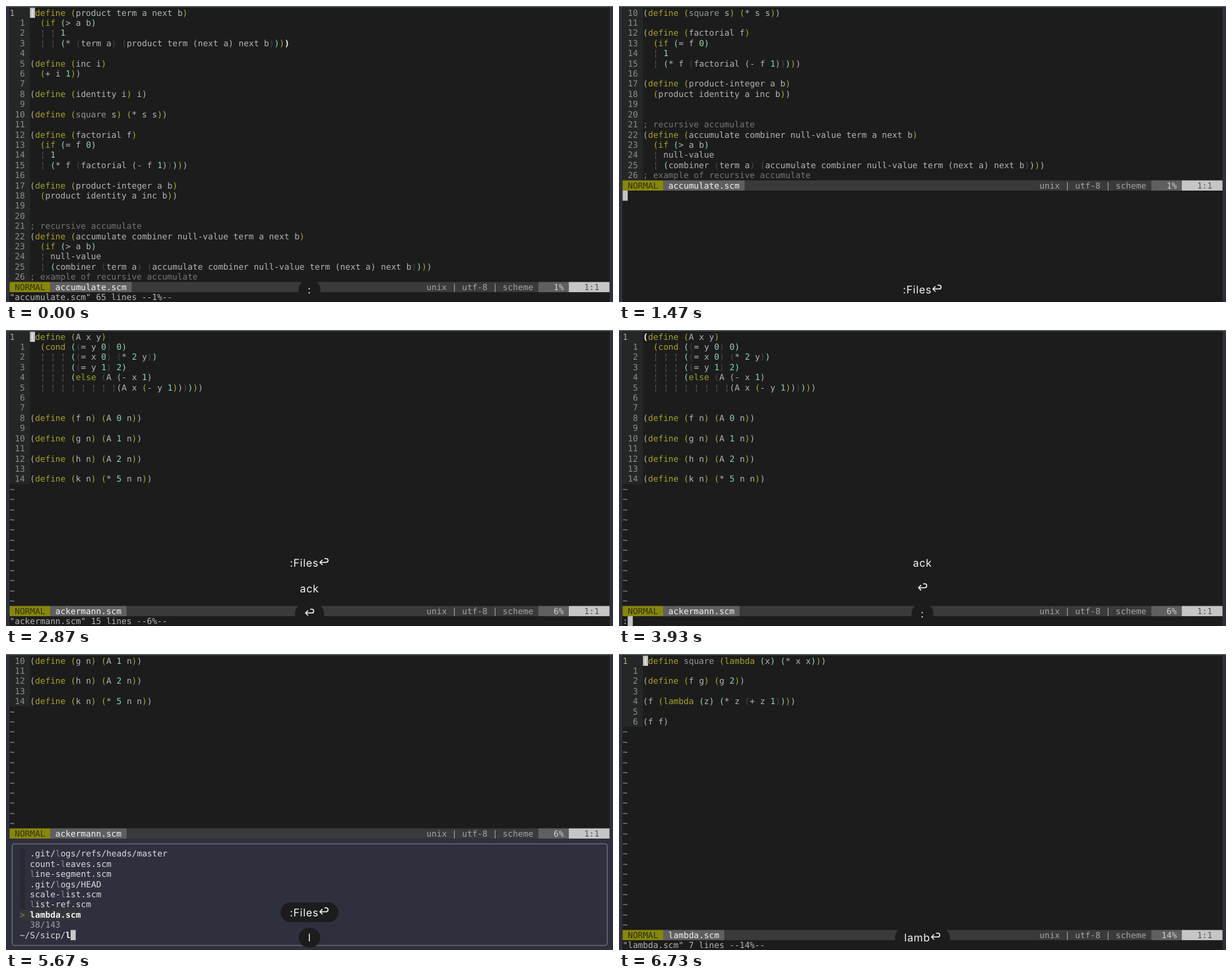
Recreate the animation shown at these times as an HTML page. Size 920 by 449 pixels, loop 8 s.

```html
<!DOCTYPE html>
<html lang="en">
<head>
<meta charset="utf-8">
<title>Fuzzy file opening</title>
<style>
  html, body { margin: 0; width: 100%; height: 100%; overflow: hidden; background: #2e303d; }
  svg { display: block; }
  text { white-space: pre; text-rendering: geometricPrecision; }
  .mono { font: 12.8px "DejaVu Sans Mono", monospace; }
  .key { font: 16px Inter, sans-serif; letter-spacing: .65px; fill: #f4f4f4; }
</style>
</head>
<body>
<svg id="stage" width="920" height="449" viewBox="0 0 920 449"></svg>
<script>
const LOOP = 8000;
const CELL_W = 7.705, CELL_H = 15.41, LEFT = 5.5, TOP = 2.6, COLS = 118;
const KEY_GAP = 500, KEY_LIFE = 2000;

const C = {
  frame: '#2e303d', bg: '#1c1c1c', gutter: '#252626', text: '#b4b4b4', dim: '#8c8c8c',
  comment: '#757575', guide: '#5a5a5a', keyword: '#a5a126', number: '#8bd5ae',
  white: '#f4f4f4', cursor: '#c4c4c4'
};
const PARENS = ['#b4b4b4', '#b0a92c', '#96d8b6', '#464646'];

const FILES = [
  { name: 'accumulate.scm', lines: 65, percent: '1%', match: 3, code: `(define (product term a next b)
  (if (> a b)
  ¦ ¦ 1
  ¦ ¦ (* (term a) (product term (next a) next b))))

(define (inc i)
  (+ i 1))

(define (identity i) i)

(define (square s) (* s s))

(define (factorial f)
  (if (= f 0)
  ¦ 1
  ¦ (* f (factorial (- f 1)))))

(define (product-integer a b)
  (product identity a inc b))


; recursive accumulate
(define (accumulate combiner null-value term a next b)
  (if (> a b)
  ¦ null-value
  ¦ (combiner (term a) (accumulate combiner null-value term (next a) next b))))
; example of recursive accumulate` },
  { name: 'ackermann.scm', lines: 15, percent: '6%', code: `(define (A x y)
  (cond ((= y 0) 0)
  ¦ ¦ ¦ ((= x 0) (* 2 y))
  ¦ ¦ ¦ ((= y 1) 2)
  ¦ ¦ ¦ (else (A (- x 1)
  ¦ ¦ ¦ ¦ ¦ ¦ ¦ ¦(A x (- y 1))))))


(define (f n) (A 0 n))

(define (g n) (A 1 n))

(define (h n) (A 2 n))

(define (k n) (* 5 n n))` },
  { name: 'lambda.scm', lines: 7, percent: '14%', code: `(define square (lambda (x) (* x x)))

(define (f g) (g 2))

(f (lambda (z) (* z (+ z 1))))

(f f)` }
];

// Each query lists its hits from top to bottom; the last one is selected.
const HITS = {
  '': [143, '.git/packed-refs .git/index .git/description .git/config .git/HEAD accumulate.scm abs.scm'],
  a: [112, 'average.scm append.scm adjoin-set.scm abs.scm adder.scm accumulate.scm ackermann.scm'],
  ac: [24, 'make-account.scm fast-exact.scm accumulate-n.scm accumulate.scm ackermann.scm'],
  ack: [1, 'ackermann.scm'],
  l: [38, '.git/logs/refs/heads/master count-leaves.scm line-segment.scm .git/logs/HEAD scale-list.scm list-ref.scm lambda.scm'],
  la: [9, '.git/logs/refs/heads/master .git/logs/HEAD count-leaves.scm lambda.scm'],
  lam: [3, '.git/logs/refs/heads/master count-leaves.scm lambda.scm'],
  lamb: [1, 'lambda.scm']
};

const SCENES = [
  [0, 'edit', 0], [70, 'command', 0], [1400, 'run', 0], [1470, 'split', 0], [1530, 'finder', 0],
  [2870, 'edit', 1], [3870, 'command', 1], [4800, 'run', 1], [4870, 'finder', 1], [6400, 'edit', 2]
];

const STROKES = [
  [0, ':'], [200, 'F'], [330, 'i'], [470, 'l'], [800, 'e'], [1130, 's'], [1400, '⏎'],
  [2070, 'a'], [2200, 'c'], [2270, 'k'], [2800, '⏎'],
  [3800, ':'], [4000, 'F'], [4130, 'i'], [4200, 'l'], [4330, 'e'], [4530, 's'], [4730, '⏎'],
  [5670, 'l'], [5730, 'a'], [5870, 'm'], [6000, 'b'], [6330, '⏎']
];

const stage = document.getElementById('stage');
const colX = col => LEFT + col * CELL_W;
const rowY = row => TOP + row * CELL_H;
const escapeXml = s => s.replace(/[&<>]/g, c => `&#${c.charCodeAt(0)};`);
const span = (s, fill, bold) =>
  `<tspan fill="${fill}"${bold ? ' font-weight="700"' : ''}>${escapeXml(s)}</tspan>`;
const line = (row, col, spans) =>
  `<text class="mono" x="${colX(col)}" y="${rowY(row) + 12}">${spans}</text>`;
const put = (row, col, s, fill = C.text, bold) => line(row, col, span(s, fill, bold));
const rect = (x, y, w, h, fill, extra = '') =>
  `<rect x="${x}" y="${y}" width="${w}" height="${h}" fill="${fill}" ${extra}/>`;
const cells = (row, col, cols, fill, rows = 1) =>
  rect(colX(col), rowY(row), cols * CELL_W, rows * CELL_H, fill);

function highlight(file) {
  let depth = 0;
  return file.code.split('\n').map((source, row) => {
    if (source[0] === ';') return span(source, C.comment);
    const tokens = source.match(/[()]|¦|\s+|[^\s()¦]+/g) || [];
    return tokens.map((token, i) => {
      if (token === '(') return span(token, PARENS[depth++ % 4]);
      if (token === ')') {
        const matched = row === file.match && i === tokens.length - 1;
        const fill = PARENS[--depth % 4];
        return span(token, matched ? C.white : fill, matched);
      }
      if (token === '¦') return span(token, C.guide);
      if (/^(define|if|cond|else|lambda)$/.test(token)) return span(token, C.keyword);
      if (/^\d+$/.test(token)) return span(token, C.number);
      return span(token, token === 'square' ? '#969696' : C.text);
    }).join('');
  });
}
FILES.forEach(file => { file.rows = highlight(file); });

function drawBuffer(file, height) {
  const first = height < 27 ? 10 : 0;
  const shown = Math.min(file.rows.length - first, height);
  let out = cells(0, 0, 4, C.gutter, shown);
  for (let row = 0; row < height; row++) {
    const n = row + first;
    if (row >= shown) { out += put(row, 0, '~', '#9a9a9a'); continue; }
    out += n ? put(row, 0, String(n).padStart(3), C.dim) : put(row, 0, '1', '#a9a994');
    out += line(row, 4, file.rows[n]);
  }
  return out + drawStatus(file, height);
}

function drawStatus(file, row) {
  return cells(row, 0, COLS, '#3a3a3a') +
    cells(row, 0, 8, '#87870c') + put(row, 1, 'NORMAL', '#30300c') +
    cells(row, 8, file.name.length + 2, '#5f5f5f') + put(row, 9, file.name, C.white) +
    put(row, 82, 'unix | utf-8 | scheme', '#a4a4a4') +
    cells(row, 104, 6, '#5f5f5f') + put(row, 106, file.percent.padStart(3), '#d0d0d0') +
    cells(row, 110, 8, '#c6c6c6') + put(row, 113, '1:1', '#555');
}

function matchedIndexes(name, query) {
  const lower = name.toLowerCase(), found = new Set();
  if (!query) return found;
  let at = lower.search(new RegExp('(?<![a-z])' + query[0]));
  if (at < 0) at = lower.indexOf(query[0]);
  for (const ch of query) {
    at = lower.indexOf(ch, at);
    if (at < 0) break;
    found.add(at++);
  }
  return found;
}

function drawFinder(query) {
  const [count, list] = HITS[query];
  const names = list.split(' ');
  let out = rect(5, rowY(18), 910, 449 - rowY(18), C.frame) +
    rect(9.4, rowY(18) + 8, 901.8, CELL_H * 10, 'none', 'rx="3" stroke="#858585"');
  names.forEach((name, i) => {
    const row = 26 - names.length + i, current = row === 25;
    const hits = matchedIndexes(name, query);
    out += cells(row, 2, current ? name.length + 2 : 1, current ? '#343537' : '#292a31');
    if (current) out += put(row, 2, '>', '#86866a');
    out += line(row, 4, [...name].map((ch, k) =>
      span(ch, current ? C.white : hits.has(k) ? '#858a8c' : '#dedede', current)).join(''));
  });
  return out + put(26, 4, count + '/143', '#a0a0a0') +
    line(27, 2, span('~/S/sicp/', '#dcdcdc') + span(query, C.white, true)) +
    cells(27, 11 + query.length, 1, '#cacaca');
}

function drawScreen(scene, file, typed) {
  const [command, query = ''] = typed.slice(typed.lastIndexOf(':')).split('⏎');
  const split = scene === 'split' || scene === 'finder';
  let out = rect(0, 0, 920, 449, C.frame) + rect(0, 0, 920, 1.5, '#56625f') +
    rect(5, 2, 910, 447, C.bg) + drawBuffer(file, split ? 17 : 27);
  if (scene === 'split') return out + cells(18, 0, 1, C.cursor);
  if (scene === 'finder') return out + drawFinder(query);
  if (scene === 'edit') {
    return out + cells(0, 4, 1, C.cursor) + put(0, 4, '(', C.white) +
      put(28, 0, `"${file.name}" ${file.lines} lines --${file.percent}--`);
  }
  const cursorCol = scene === 'run' ? 0 : command.length;
  return out + put(0, 4, '(', C.white, true) +
    cells(28, cursorCol, 1, C.cursor) + put(28, 0, command);
}

const ruler = document.createElement('canvas').getContext('2d');
function textWidth(s) {
  ruler.font = '16px Inter, sans-serif';
  return ruler.measureText(s).width + s.length * .65;
}

function drawPill(label, centerY) {
  const enter = label.endsWith('⏎');
  const word = label.replace('⏎', '');
  const wordW = textWidth(word);
  const width = wordW + (enter ? 16 : 0) + 28;
  const left = 460 - width / 2, x = left + 14;
  let out = rect(left, centerY - 14.8, width, 29.6, C.bg, 'rx="14.8"');
  if (word) out += `<text class="key" x="${x}" y="${centerY + 5.6}">${word}</text>`;
  if (enter) {
    out += `<path transform="translate(${x + wordW + 1} ${centerY - 1})" fill="none" ` +
      `stroke="${C.white}" stroke-width="1.5" stroke-linecap="round" stroke-linejoin="round" ` +
      `d="M1 0H10.5a2.9 2.9 0 0 0 0-5.8H8.5M4.5-3.5L1 0l3.5 3.5"/>`;
  }
  return out;
}

function drawKeys(strokes, t) {
  const pills = [];
  strokes.forEach(([at, key]) => {
    const last = pills[pills.length - 1];
    if (last && at - last.at <= KEY_GAP) { last.label += key; last.at = at; }
    else pills.push({ label: key, at });
  });
  return pills.filter(p => t < p.at + KEY_LIFE).reverse()
    .map((p, i) => drawPill(p.label, 430.3 - 38.4 * i)).join('');
}

let shownMarkup = '';
function render(t) {
  const [, scene, file] = SCENES.filter(s => s[0] <= t).pop();
  const strokes = STROKES.filter(s => s[0] <= t);
  const typed = strokes.map(s => s[1]).join('');
  const markup = drawScreen(scene, FILES[file], typed) + drawKeys(strokes, t);
  if (markup !== shownMarkup) stage.innerHTML = shownMarkup = markup;
}

const start = performance.now();
function tick() {
  render((performance.now() - start) % LOOP);
  requestAnimationFrame(tick);
}
tick();
</script>
</body>
</html>
```
